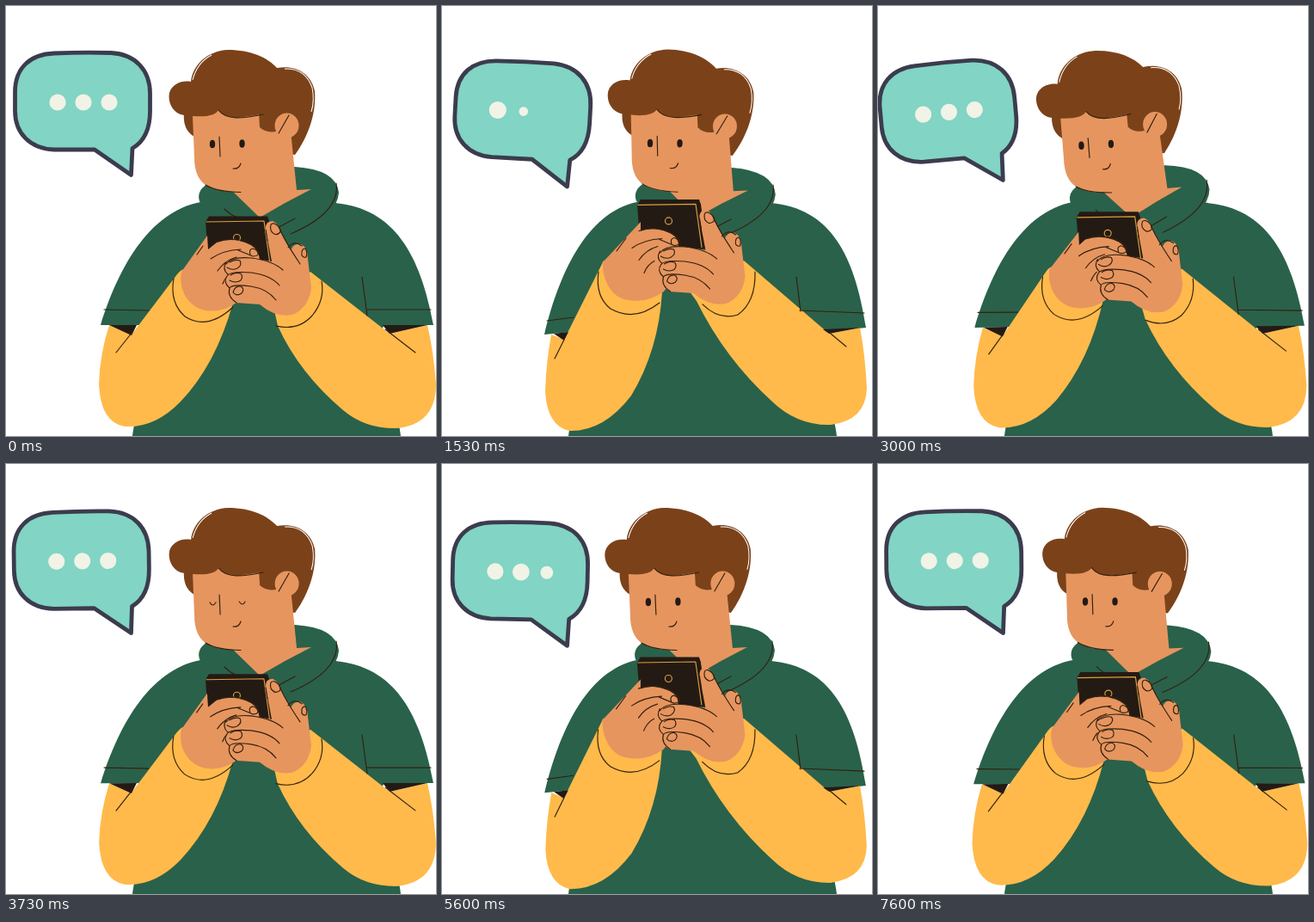
An HTML page for the animation above (7.66 s loop, 500 by 500 pixels).

```html
<!DOCTYPE html>
<html>
<head>
<meta charset="utf-8">
<style>
  html, body { margin: 0; width: 100%; height: 100%; overflow: hidden; background: #fff; }
  svg { display: block; width: 100vw; height: 100vh; }
  .green { fill: #2a614a; }
  .yellow { fill: #ffba4b; }
  .skin { fill: #e6955f; }
  .hair { fill: #7b421a; }
  .dark { fill: #241a14; }
  .ink, .trim { fill: none; stroke: #33200f; stroke-width: 1.15; stroke-linecap: round; stroke-linejoin: round; }
  .trim { stroke: #d9a03f; }
  .gap { fill: none; stroke: #fff; stroke-width: 1; }
</style>
</head>
<body>
<svg viewBox="0 0 500 500">
  <g id="bubble">
    <path d="M56 55Q90 53.500 122 54.500C150 56 167.500 74 167.500 102V122C167.500 144 160 158 147 165.500L145.500 196.500L103 167H56C28 166 10.500 148 10.500 122V100C10.500 72 28 56 56 55Z"
      fill="#82d4c4" stroke="#3b3c4e" stroke-width="4.800" stroke-linejoin="round"/>
    <g id="dots" fill="#f0f3e6">
      <circle cx="60" cy="112"/><circle cx="90" cy="112"/><circle cx="120" cy="112"/>
    </g>
  </g>
  <path class="green" d="M228 229Q300 215 384 229L440 380L455 480Q458 490 459 500H147Q149 480 175 380Z"/>
  <g id="torso"></g>
  <g id="head">
    <path class="green" d="M236 206Q221 214 225 227Q232 240 262 246L300 264L333 264Q385 246 387 217Q384 190 336 187Z"/>
    <path class="hair" d="M207 124Q205 144 219 152L224 124Z"/>
    <path class="hair" d="M222 140L218 129L207 127C195 125 189.500 115 189.500 105C190 92 203 86 215 88C217 68 235 52 258 51C285 51 304 60 315 72C336 68 355 78 359 99C361 122 353 150 336 173L328 172L300 140Z"/>
    <path class="gap" d="M217 86Q222 66 239 57M324 73Q348 72 356 95Q359 110 355 123"/>
    <path class="skin" d="M217 128Q242 130 247 121C258 136 282 127 299 126L296 142L331 145L338 214L355 213Q325 228 295 246L264 216Q245 216 232 208Q219 199 219 176Z"/>
    <path class="hair" d="M294 124L320 120L314 146Q302 148 295 141Z"/>
    <ellipse class="skin" cx="326.500" cy="139" rx="14" ry="14.500"/>
    <path class="ink" d="M317 148L329 127M232 208Q245 216 273 216.500M248 152L249 175M264 189Q271 190 273 183M247 121C256 133 275 131 299 126M254 236Q262 244 270 246M336 247L312 260M384 206Q389 240 331 265"/>
    <g id="open" class="dark">
      <ellipse cx="240" cy="160.500" rx="3.200" ry="4.700"/><ellipse cx="274.500" cy="160" rx="3.200" ry="4.700"/>
    </g>
    <path id="closed" class="ink" d="M237 161q3 6 7 0M271 160q4 6 7 0"/>
  </g>
  <g id="arms"></g>
  <g id="phone">
    <path class="dark" d="M232 251L236 244.500L304 244.500L306 250L313 302H236Z"/>
    <path class="trim" d="M233 251L300 250L307 300"/>
    <circle class="trim" cx="268.500" cy="269.500" r="4"/>
  </g>
  <g id="palm"></g>
  <path id="fingers" class="ink" d="M246 274Q254 271 262 271Q284 272 293 284Q296 291 287 291L270 284M284 289Q282 283 287 282Q293 284 293 288M238 294Q252 284 273 283M246 308Q254 296 268 292M252 323Q256 313 264 309"/>
  <g id="right">
    <path class="skin" d="M302 260Q301 250 310 250Q317 253 320 264L331 284Q335 275 343 277Q351 281 351 294L355 328Q352 351 333 359Q314 363 295 347L267 345Q258 340 259 331Q252 325 256 314Q251 306 256 298Q264 292 285 293L309 297Z"/>
    <path class="ink" d="M302 260L304 273M318 258Q322 270 342 300M328 281Q335 272 344 279M256 300Q262 291 285 293Q310 296 322 307M257 314Q260 308 285 310Q308 313 318 325M260 328Q263 323 285 326Q304 329 314 342M256 298Q251 306 258 312M257 314Q252 321 260 328M260 328Q257 338 268 345"/>
    <path class="ink" d="M308 261Q306 252 312 253Q319 256 319 263Q313 269 308 261M344 290Q343 282 348 282Q351 287 349 292Q346 293 344 290M257 304Q263 308 269 305Q275 301 272 296Q266 294 260 298M260 319Q267 323 273 319Q276 315 273 311Q266 309 261 313M264 333Q268 338 274 334Q278 329 273 326Q266 325 264 333"/>
  </g>
</svg>
<script>
const $ = id => document.getElementById(id);
const LOOP = 7660, SWAY = LOOP / 2;

// Each part: group, class, path with arms low, path with arms raised
const parts = [
  ["torso", "green",
    "M232 227C170 235 132 300 110 371L160 371L200 400L420 400L440 371L497 371C482 290 452 235 382 229Z",
    "M232 227C172 236 138 304 119 382L150 379L200 400L420 400L445 379L493 374C480 290 452 235 382 229Z"],
  ["arms", "yellow",
    "M120 371L146 382L196 316Q203 306 207 306L264 345Q244 417 203 460Q173 491 138 489Q110 484 108 440Q109 405 120 371Z",
    "M127 382L142 388L186 300Q188 294 190 297L256 332Q252 400 220 453Q188 495 148 494Q122 488 120 448Q121 415 127 382Z"],
  ["arms", "yellow",
    "M490 371L446 381L354 309L310 345L316 372Q341 427 392 470Q418 492 455 491Q500 486 500 440Q497 400 490 371Z",
    "M486 374L450 381L351 296L288 332L296 343Q329 410 384 460Q413 488 452 487Q493 482 494 444Q492 405 486 374Z"],
  ["arms", "dark",
    "M120 371L146 383L152 371ZM438 371L446 381L490 371Z",
    "M130 381L142 389L147 379ZM443 376L450 381L487 374Z"],
  ["arms", "ink",
    "M114 353L166 354M147 379L128 403M414 315L420 360M419 353L494 353M441 376L476 403",
    "M122 366L153 362M142 388L131 410M412 315L417 355M416 354L491 357M446 376L470 396"],
  ["arms", "ink",
    "M195 317Q190 345 208 361Q234 378 264 350M314 372Q340 378 356 360Q371 342 367 320",
    "M182 309Q178 338 196 352Q224 368 253 345M303 347Q322 366 344 359Q365 344 364 309"],
  ["palm", "skin",
    "M234 267L204 309C200 330 212 350 232 354Q252 357 268 345L296 300L294 290Q292 280 278 275Q262 269 245 275L235 283Z",
    "M231 251L187 298C186 318 197 340 217 342Q238 346 258 332L280 300L275 280Q276 268 262 263Q246 256 230 262L231 264Z"],
  ["palm", "ink", "M222 289L229 279", "M203 285L214 270"]
].map(([group, cls, low, high]) => {
  const el = document.createElementNS("http://www.w3.org/2000/svg", "path");
  el.setAttribute("class", cls);
  $(group).append(el);
  return { el, low, high: high.match(/\d+/g) };
});

const mix = (low, high, k) => {
  let i = 0;
  return low.replace(/\d+/g, n => (+n + (high[i++] - n) * k).toFixed(2));
};
const clamp = x => Math.min(1, Math.max(0, x));
const wave = (t, period) => Math.sin(2 * Math.PI * t / period);
const lift = (t, period) => (1 - Math.cos(2 * Math.PI * t / period)) / 2;
const move = (id, x, y) => $(id).setAttribute("transform", `translate(${x} ${y})`);

// A dot swells slightly, shrinks away, then pops back and settles
function dotScale(t, i) {
  const out = t - 700 - 200 * i, back = t - 1230 - 200 * i;
  if (back > 0) return 1.1 * clamp(back / 200) - 0.1 * clamp((back - 200) / 200);
  return (1 + 0.1 * clamp((out + 200) / 200)) * (1 - clamp(out / 200));
}

function draw(now) {
  const t = now % LOOP;
  const k = lift(t, 3600) * 1.06;
  for (const p of parts) p.el.setAttribute("d", mix(p.low, p.high, k));
  move("phone", -5 * k, -19.5 * k);
  move("fingers", -17 * k, -12.5 * k);
  move("right", -2.5 * k, -13 * k);

  $("head").setAttribute("transform", `rotate(${2.3 * wave(t, 3720)} 285 255)`);
  const shut = t >= 3200 && t < 5300;
  $("open").style.display = shut ? "none" : "";
  $("closed").style.display = shut ? "" : "none";

  $("bubble").setAttribute("transform",
    `translate(0 ${15 * lift(t, SWAY)}) rotate(${5.3 * wave(t, SWAY)} 146 198)`);
  [...$("dots").children].forEach((dot, i) => dot.setAttribute("r", 9.6 * dotScale(t % SWAY, i)));
}

const start = performance.now();
function tick() {
  draw(performance.now() - start);
  requestAnimationFrame(tick);
}
tick();
</script>
</body>
</html>
```
